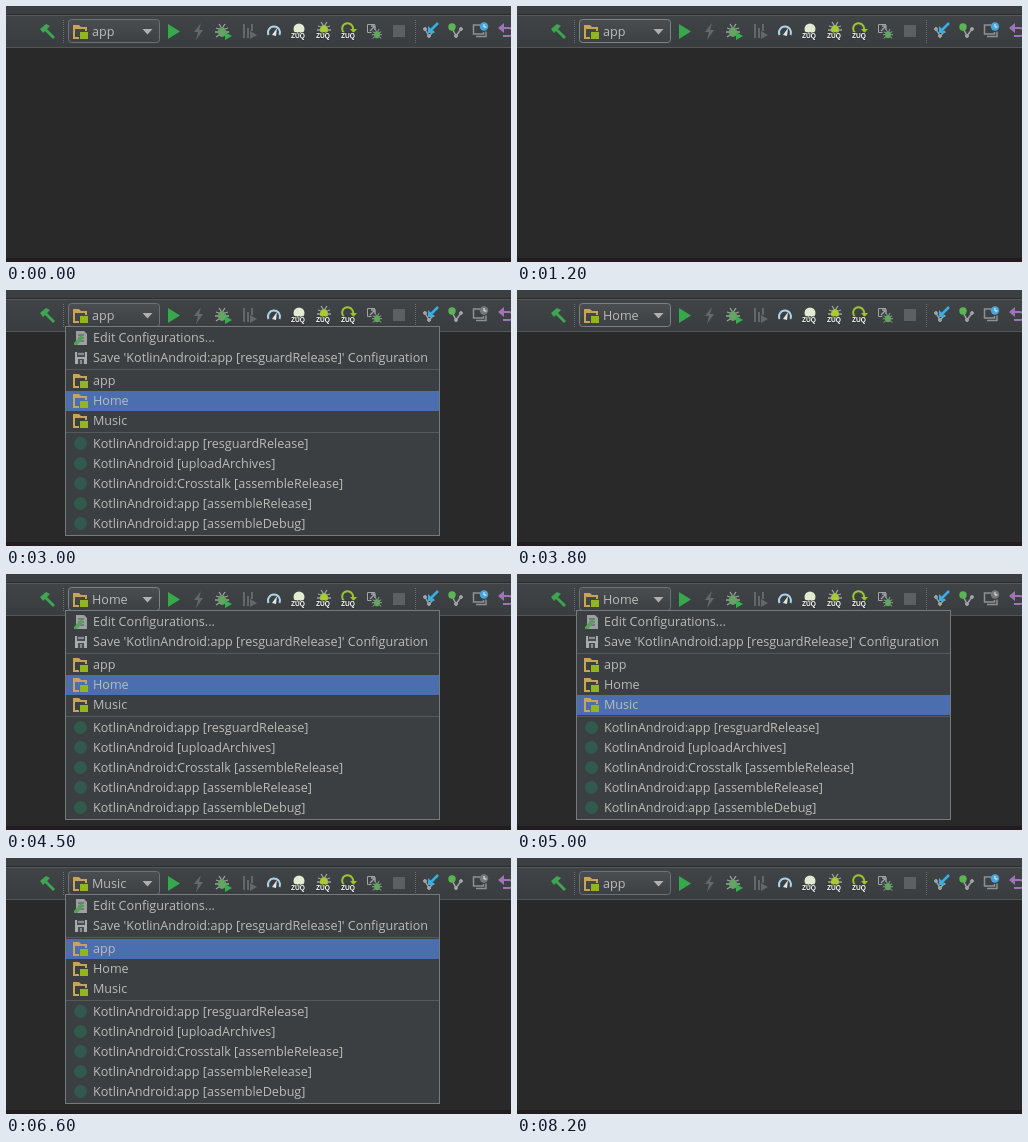
Recreate the animation shown at these times as an HTML page. Size 505x256 px, loop 9000 ms.

```html
<!DOCTYPE html>
<html lang="en">
<head>
<meta charset="utf-8">
<title>Run configuration switcher</title>
<style>
html, body { margin: 0; width: 100%; height: 100%; overflow: hidden; background: #292929; }
svg { display: block; width: 505px; height: 256px; }
text { font: 12.6px "Open Sans", "Noto Sans", sans-serif; fill: #bbb; white-space: pre; }
.tag { font: bold 6.6px "Liberation Sans", sans-serif; fill: #fff; }
.line { fill: none; stroke-width: 2; }
</style>
</head>
<body>
<svg viewBox="0 0 505 256">
  <defs>
    <linearGradient id="bar" x2="0" y2="1">
      <stop stop-color="#414446"/><stop offset="1" stop-color="#3a3d3f"/>
    </linearGradient>
    <linearGradient id="button" x2="0" y2="1">
      <stop stop-color="#4a4e50"/><stop offset="1" stop-color="#3d4042"/>
    </linearGradient>
    <g id="module">
      <path d="M0 1h6l2 2h6v4h-2V5H2v8h4v2H0z" fill="#c9a356"/>
      <rect x="7" y="8" width="8" height="7" fill="#93b51f"/>
    </g>
    <circle id="task" cx="7.5" cy="7.5" r="6.5" fill="#315a4d"/>
    <g id="edit">
      <path d="M3 1h8l3 3v11H3z" fill="#9da0a2"/>
      <path d="M5 5h6M5 8h6M5 11h6" stroke="#505355"/>
      <path d="M1 13l7-8 3 3-7 7H1z" fill="#57a05a"/>
    </g>
    <g id="save">
      <path d="M2 2h12v12H2z" fill="#a9acae"/>
      <path d="M4 2h8v5H4zM5 9h6v5H5z" fill="#4a4d4f"/>
      <path d="M5 4h6M8 10v4" stroke="#c8cacb"/>
    </g>
    <g id="bug">
      <path d="M-6-3l3 1m-4 3h14m-13 5l3-2M6-3L3-2m3 8L3 4M-3-7l2 3m4-3L1-4" stroke="#a0a3a5" stroke-width="1.3"/>
      <ellipse rx="4" ry="5" cy="1"/>
    </g>
  </defs>

  <rect width="505" height="9" fill="#3c3f41"/>
  <rect y="8" width="505" height="1" fill="#292b2c"/>
  <rect y="9" width="505" height="32" fill="url(#bar)"/>
  <rect y="9" width="505" height="1" fill="#555859"/>
  <rect y="41" width="505" height="1" fill="#555"/>
  <rect y="252" width="505" height="4" fill="#241c21"/>
  <path d="M57.5 14v24M409.5 14v24" stroke="#6a6d6f" stroke-dasharray="1 1"/>

  <rect id="hover" y="13.5" width="24" height="24" rx="3" fill="#505456" stroke="#626668"/>
  <rect id="combo" x="62.5" y="13.5" width="91" height="23" rx="3" fill="url(#button)"/>
  <use href="#module" x="67" y="18"/>
  <text id="current" x="86" y="30"></text>
  <path d="M136.500 23h10l-5 5.500z" fill="#b0b0b0"/>

  <!-- build, run, apply, debug, coverage, profile -->
  <path d="M34 23l6-5 4 2-3 3 8 8-2 2-8-8-2 2z" fill="#3ea650"/>
  <path d="M162 18l12 7.500-12 7.500z" fill="#37a94c"/>
  <path d="M195 17l-7 9h4l-2 8 7-10h-4z" fill="#65686a"/>
  <use href="#bug" x="216" y="25" fill="#65a463"/>
  <path d="M219 26l7 4-7 4z" fill="#36b04c"/>
  <path d="M238 18v14M242 22v10M246 18v7" class="line" stroke="#64676a"/>
  <path d="M244 25l7 4-7 4z" fill="#64676a"/>
  <path d="M262.500 29a6 6 0 1 1 11 0" class="line" stroke="#a9d3ea" stroke-width="2.500"/>
  <path d="M266 29l5-7-1 8z" fill="#e0e5e8"/>

  <!-- reload plugin -->
  <circle cx="293" cy="23" r="5.500" fill="#e3ead2"/>
  <use href="#bug" x="318" y="23" fill="#a8ca32"/>
  <path d="M340 28a5.500 5.500 0 1 1 7-4" class="line" stroke="#9bc52c"/>
  <path d="M344 23h7l-3.500 4z" fill="#9bc52c"/>
  <g id="tags"></g>

  <!-- attach, stop -->
  <path d="M369 18.500h-7.500v8h4" class="line" style="stroke-width:1" stroke="#a2a5a7"/>
  <path d="M364 25l5-5m-4 0h4v4" class="line" style="stroke-width:1.300" stroke="#a2a5a7"/>
  <use href="#bug" transform="translate(371 28) scale(.72)" fill="#60a85b"/>
  <rect x="387" y="19" width="12" height="12" fill="#5d6062"/>

  <!-- version control -->
  <g fill="#a0a3a5" stroke="#a0a3a5">
    <path d="M419 23l4 7 5-5M446 22l4 8 5-7" class="line" style="stroke-width:1.500"/>
    <circle cx="419" cy="23" r="1.500"/><circle cx="423" cy="30" r="1.500"/>
    <circle cx="450" cy="30" r="1.500"/><circle cx="455" cy="23" r="1.500"/>
  </g>
  <path d="M432 17l-7 7" class="line" stroke="#38afe0" style="stroke-width:2.500"/>
  <path d="M422 20v7h7z" fill="#38afe0"/>
  <circle cx="446" cy="21" r="3.700" fill="#5cb554"/>
  <path d="M474 19h-6.500v9h10v-2M470 30.500h10v-5" class="line" stroke="#8e9193" style="stroke-width:1.500"/>
  <circle id="history" cx="478" cy="20.500" r="4.200"/>
  <path d="M478 18v3h2.500" fill="none" stroke="#eee"/>
  <path d="M496 22h7a4 4 0 0 1 0 8h-6" class="line" stroke="#a074b8"/>
  <path d="M492 22l6-5v10z" fill="#a074b8"/>

  <g id="popup">
    <rect x="59.500" y="36.500" width="374" height="209" fill="#3c3f41" stroke="#777a7c"/>
    <rect id="selection" x="60" width="373" height="20" fill="#4b6eaf"/>
    <path d="M60 79.500h373M60 142.500h373" stroke="#56595b"/>
    <g id="rows"></g>
  </g>
</svg>
<script>
const $ = id => document.getElementById(id);
const LOOP = 9000;
const apps = ['app', 'Home', 'Music'];

const rows = [
  [52, 'edit', 'Edit Configurations...'],
  [72, 'save', "Save 'KotlinAndroid:app [resguardRelease]' Configuration"],
  ...apps.map((name, i) => [95 + 20 * i, 'module', name]),
  ...[':app [resguardRelease]', ' [uploadArchives]', ':Crosstalk [assembleRelease]',
    ':app [assembleRelease]', ':app [assembleDebug]'
  ].map((task, i) => [158 + 20 * i, 'task', 'KotlinAndroid' + task])
];
$('rows').innerHTML = rows.map(([y, icon, label]) =>
  `<use href="#${icon}" x="67" y="${y - 12}"/><text x="87" y="${y}">${label}</text>`).join('');
$('tags').innerHTML = [285, 310, 335].map(x =>
  `<text class="tag" x="${x}" y="32" stroke="#303335" stroke-width="1.5" paint-order="stroke">ZUQ</text>`).join('');

// Each track lists [start in ms, value]; a value holds until the next start.
const tracks = {
  current: [[0, 0], [3800, 1], [5700, 2], [8000, 0]],
  open: [[0, false], [1600, true], [3500, false], [4500, true], [5400, false], [6200, true], [7600, false]],
  selected: [[0, 0], [2000, 1], [2500, 0], [3000, 1], [5000, 2], [6500, 1], [6600, 0]],
  hover: [[0, 0], [600, 281], [700, 256], [800, 206], [900, 156], [1200, 0], [8000, 156], [8100, 206], [8200, 0]],
  comboHover: [[0, false], [1200, true], [1800, false], [3800, true], [4700, false], [5700, true], [6300, false]],
  history: [[0, true], [1900, false], [3800, true], [4800, false], [5700, true], [6400, false], [8000, true]]
};
const valueAt = (track, t) => track.filter(([start]) => start <= t).pop()[1];

function draw() {
  const t = performance.now() % LOOP;
  const now = name => valueAt(tracks[name], t);
  const show = (id, on) => $(id).setAttribute('visibility', on ? 'visible' : 'hidden');
  $('current').textContent = apps[now('current')];
  show('popup', now('open'));
  $('selection').setAttribute('y', 81 + 20 * now('selected'));
  show('hover', now('hover'));
  $('hover').setAttribute('x', now('hover') + 0.5);
  $('combo').setAttribute('stroke', now('comboHover') ? '#7f8284' : '#6f7274');
  $('history').setAttribute('fill', now('history') ? '#4aa5d8' : '#77797b');
  requestAnimationFrame(draw);
}
draw();
</script>
</body>
</html>
```
